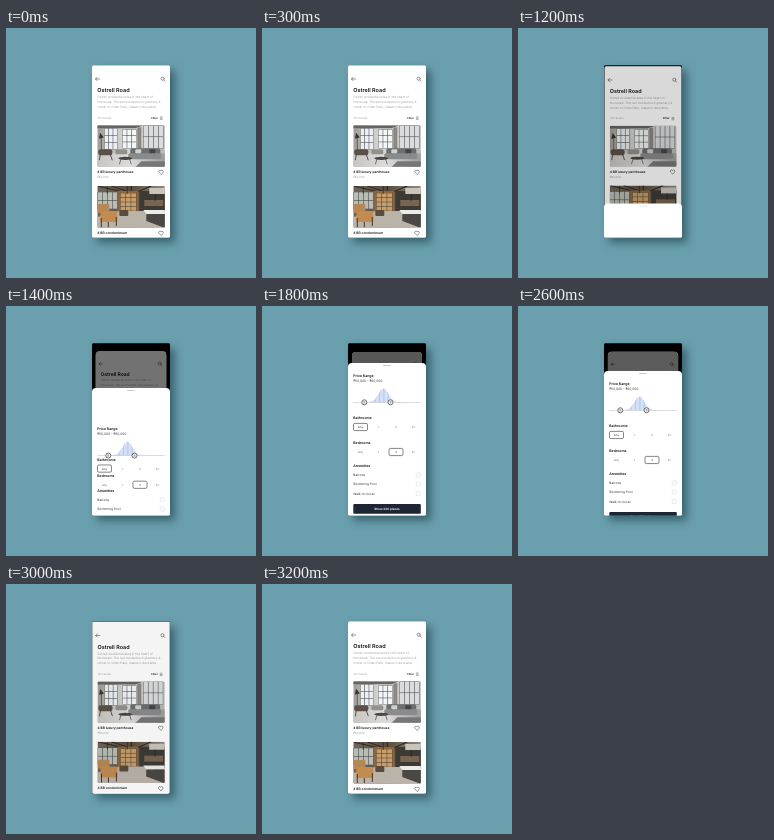
An HTML page for the animation above (3.5 s loop, 250 by 250 pixels).

```html
<!DOCTYPE html>
<html lang="en">
<head>
<meta charset="utf-8">
<title>Home search filter</title>
<style>
  html, body { margin: 0; height: 100%; overflow: hidden; background: #6a9fad; }
  svg { display: block; width: 100vw; height: 100vh; }
  text { font-family: Inter, "Open Sans", sans-serif; font-size: 3.1px; fill: #333; text-rendering: geometricPrecision; }
  .b { font-weight: 600; fill: #111; }
  .g { fill: #a2a2a2; }
  .m { text-anchor: middle; font-size: 2.8px; fill: #666; }
  .line { fill: none; stroke: #333; stroke-width: .5; stroke-linecap: round; stroke-linejoin: round; }
  .shadow { filter: drop-shadow(5px 5px 4.5px rgba(10, 40, 50, .5)); }
</style>
</head>
<body>
<svg viewBox="0 0 250 250">
  <defs>
    <clipPath id="screen"><rect x="86" y="37.2" width="78" height="172.6" rx="1.4"/></clipPath>
    <clipPath id="photo"><rect width="67.5" height="41.5" rx="1"/></clipPath>
    <linearGradient id="wall" x2="1"><stop stop-color="#a19c96"/><stop offset=".4" stop-color="#d8d9d8"/><stop offset="1" stop-color="#b9b8b5"/></linearGradient>
    <linearGradient id="floor" x2="1"><stop stop-color="#c9c5c0"/><stop offset=".5" stop-color="#dddcda"/><stop offset="1" stop-color="#9c9b9a"/></linearGradient>
    <linearGradient id="ceiling" x2="1"><stop stop-color="#6f665b"/><stop offset=".5" stop-color="#5a4c3d"/><stop offset="1" stop-color="#938b80"/></linearGradient>
  </defs>
  <rect class="shadow" x="86" y="37.2" width="78" height="172.6" rx="1.4"/>
  <g clip-path="url(#screen)">
    <g id="list"></g>
    <g id="sheet"></g>
  </g>
</svg>
<script>
const $ = id => document.getElementById(id);
const text = (x, y, s, cls = "", size = "") =>
  `<text x="${x}" y="${y}" class="${cls}"${size && ` style="font-size:${size}px"`}>${s}</text>`;
const rect = (x, y, w, h, fill, more = "") =>
  `<rect x="${x}" y="${y}" width="${w}" height="${h}" fill="${fill}" ${more}/>`;
const path = (d, more = 'class="line"') => `<path d="${d}" ${more}/>`;
const photo = (y, parts) => `<g transform="translate(91.3 ${y})" clip-path="url(#photo)">${parts}</g>`;
const heart = y => path(`M155 ${y + 2.3}l-2.1-2.1a1.2 1.2 0 0 1 2.1-1.4a1.2 1.2 0 0 1 2.1 1.4z`);

function panes(x, y, w, h, cols, rows, light) {
  let s = rect(x, y, w, h, "#3d3f40");
  const cw = w / cols, ch = h / rows;
  for (let i = 0; i < cols * rows; i++)
    s += rect(x + i % cols * cw + .25, y + (i / cols | 0) * ch + .25, cw - .5, ch - .5, light);
  return s;
}

const lounge =
  rect(0, 0, 68, 42, "url(#wall)") +
  path("M0 0h46l-8 3H0z", 'fill="#67635f"') +
  rect(0, 28, 68, 14, "url(#floor)") +
  panes(7, 3, 13, 21, 3, 3, "#eceff1") +
  panes(25, 4, 14, 19, 3, 3, "#f3f5f6") +
  rect(40, 2, 4, 24, "#8b8884") +
  panes(46, 0, 20, 23, 4, 2, "#d9dddf") +
  path("M3 8l3 4l-4 1zM4 12v15", 'fill="#35322e" stroke="#35322e" stroke-width=".6"') +
  rect(1, 24, 14, 6, "#5b5148", 'rx="2"') +
  path("M3 29l-1 6M13 29l2 6", 'stroke="#3b342d" stroke-width=".8"') +
  rect(18, 24, 12, 5, "#94908b", 'rx="1.5"') +
  rect(33, 23, 30, 8, "#6c6e70", 'rx="2"') +
  rect(31, 28, 33, 6, "#8a8b8c", 'rx="1.5"') +
  rect(38, 24, 6, 4, "#cfcfce", 'rx="1"') +
  rect(52, 24, 6, 4, "#434547", 'rx="1"') +
  '<ellipse cx="28" cy="33" rx="7" ry="1.6" fill="#4a4642"/>' +
  path("M24 33l-2 6M32 33l2 6", 'stroke="#4a4642" stroke-width=".7"') +
  path("M44 36h24v6H38z", 'fill="#77777a"');

const kitchen =
  rect(0, 0, 68, 42, "url(#ceiling)") +
  path("M0 0l26 6M14 0l18 6M34 0v6M54 0l-14 6", 'stroke="#322b24" stroke-width="1.2"') +
  panes(0, 6, 20, 17, 4, 2, "#b9bdb3") +
  rect(20, 5, 21, 21, "#8b653d") +
  panes(23, 7, 16, 18, 3, 4, "#c79d68") +
  rect(42, 5, 26, 21, "#3d3a36") +
  rect(52, 2, 16, 6, "#c9c5bd") +
  rect(47, 14, 19, 6, "#77654f") +
  path("M0 31l22-6h30l16 9v8H0z", 'fill="#b9b3aa"') +
  rect(0, 18, 12, 9, "#b78854", 'rx="1"') +
  rect(3, 25, 17, 11, "#c08c50", 'rx="1"') +
  path("M4 32v9M19 31v9M11 36v5", 'stroke="#4a3521" stroke-width="1"') +
  rect(22, 24, 9, 6, "#5a4c3c", 'rx="1"') +
  path("M46 24h22v4H49z", 'fill="#eeece8"') +
  path("M49 28h19v14l-19-7z", 'fill="#4a4744"') +
  path("M10 0v8M30 0v8M58 8v7", 'stroke="#24211e" stroke-width=".6"');

$("list").innerHTML =
  rect(86, 37, 78, 173, "#fff", 'id="card"') +
  path("M93.6 51h-4m1.6-1.7l-1.7 1.7l1.7 1.7") +
  path("M158.3 50.7a1.6 1.6 0 1 0-3.2 0a1.6 1.6 0 1 0 3.2 0m-.5 1.2l1.3 1.3") +
  text(91.3, 64.2, "Ostrell Road", "b", 5.5) +
  text(91.3, 70.2, "Ostrell residential area in the heart of", "g", 3.2) +
  text(91.3, 75.1, "Norravale. The surrounded lush greenery &amp;", "g") +
  text(91.3, 80, "closer to Orlan Park, makes it desirable.", "g", 3.2) +
  text(91.3, 91, "121 results", "g", 2.9) +
  text(145.3, 91, "Filter", "b", 2.7) +
  path("M154.3 89h2M154.3 90.2h2M154.3 91.4h2", 'class="line" style="stroke-width:.4"') +
  photo(97.3, lounge) +
  text(91.3, 145, "4 BR luxury penthouse", "b", 3.3) + heart(144) +
  text(91.3, 150.4, "₹60,000", "g", 2.9) +
  photo(158, kitchen) +
  text(91.3, 206, "4 BR condominium", "b", 3.3) + heart(205) +
  rect(86, 37, 78, 173, "#000", 'id="dim"');

function options(y, pick) {
  const xs = [98.5, 116, 134, 151.5];
  return rect(xs[pick] - 7, y - 3.6, 14, 7.2, "#fff", 'rx="1.3" stroke="#333" stroke-width=".6"') +
    ["Any", "1", "2", "3+"].map((s, i) => text(xs[i], y + 1, s, "m" + (i == pick ? " b" : ""))).join("");
}

function bars() {
  let s = "";
  for (let x = 104; x < 147; x += 1.3) {
    const h = 13.5 * Math.exp(-(((x - 121) / 7) ** 2)) + .3;
    s += rect(x, 96.3 - h, 1, h, x < 128 ? "#b9cdf0" : "#d5dff0");
  }
  return s;
}

const knob = x => `<circle cx="${x}" cy="96.3" r="2.5" fill="#fff" stroke="#333" stroke-width=".7"/>` +
  path(`M${x - .5} 95.5v1.6M${x + .5} 95.5v1.6`, 'class="line" style="stroke-width:.4"');

const amenity = (s, i) => text(91.3, 170 + i * 9.4, s, "", 3.2) +
  rect(154.3, 166.8 + i * 9.4, 4, 4, "#fff", 'rx=".5" stroke="#ccc" stroke-width=".4"');

const sections = [
  text(91.3, 70.7, "Price Range", "b", 3.5) + text(91.3, 75.9, "₹50,000 - ₹60,000", "", 3.3) +
    bars() + rect(91.3, 96.1, 67.5, .5, "#bbb") + knob(102.3) + knob(128.5),
  text(91.3, 113.3, "Bathrooms", "b", 3.5) + options(121, 0),
  text(91.3, 138.3, "Bedrooms", "b", 3.5) + options(146, 2),
  text(91.3, 161.2, "Amenities", "b", 3.5) + ["Balcony", "Swimming Pool", "Walk-in closet"].map(amenity).join("") +
    rect(91.3, 198, 67.5, 9.7, "#1c2733", 'rx="1"') +
    `<text x="125" y="204" class="m" style="font-size:3.1px;font-weight:600;fill:#fff">Show 220 places</text>`
];
$("sheet").innerHTML = rect(86, 57, 78, 170, "#fff", 'rx="4"') +
  rect(121, 59.2, 8, .8, "#bbb", 'id="handle" rx=".4"') +
  sections.map(s => `<g class="part">${s}</g>`).join("");
const parts = document.querySelectorAll(".part");
const lag = [29, 17, 8, 0];

const sigmoid = x => 1 / (1 + Math.exp(-x));
const smooth = x => x * x * (3 - 2 * x);
function openness(t) {
  if (t < 1100 || t >= 3200) return 0;
  if (t < 1800) return sigmoid((t - 1286) * .01435);
  return t < 2400 ? 1 : sigmoid((2756 - t) * .0186);
}

function draw(now) {
  const t = Math.floor(now % 3500 / 100) * 100; // ten steps a second
  const p = openness(t), closing = t >= 2400;
  const shade = closing ? p ** .6 : p;
  const shrink = closing ? shade : smooth(p);
  const spread = closing ? 0 : Math.min(1.3, (1 - p) * 6);
  $("list").setAttribute("transform", `translate(125 123.5) scale(${1 - .103 * shrink}) translate(-125 -123.5)`);
  for (const id of ["card", "dim"]) $(id).setAttribute("rx", 4 * Math.min(1, shrink * 3));
  $("dim").setAttribute("opacity", .66 * shade);
  $("handle").setAttribute("opacity", Math.min(1, p * 2));
  $("sheet").setAttribute("transform", `translate(0 ${153 * (1 - p)})`);
  $("sheet").setAttribute("visibility", p ? "visible" : "hidden");
  parts.forEach((el, i) => el.setAttribute("transform", `translate(0 ${lag[i] * spread})`));
}

function loop() {
  draw(performance.now());
  requestAnimationFrame(loop);
}
loop();
</script>
</body>
</html>
```
